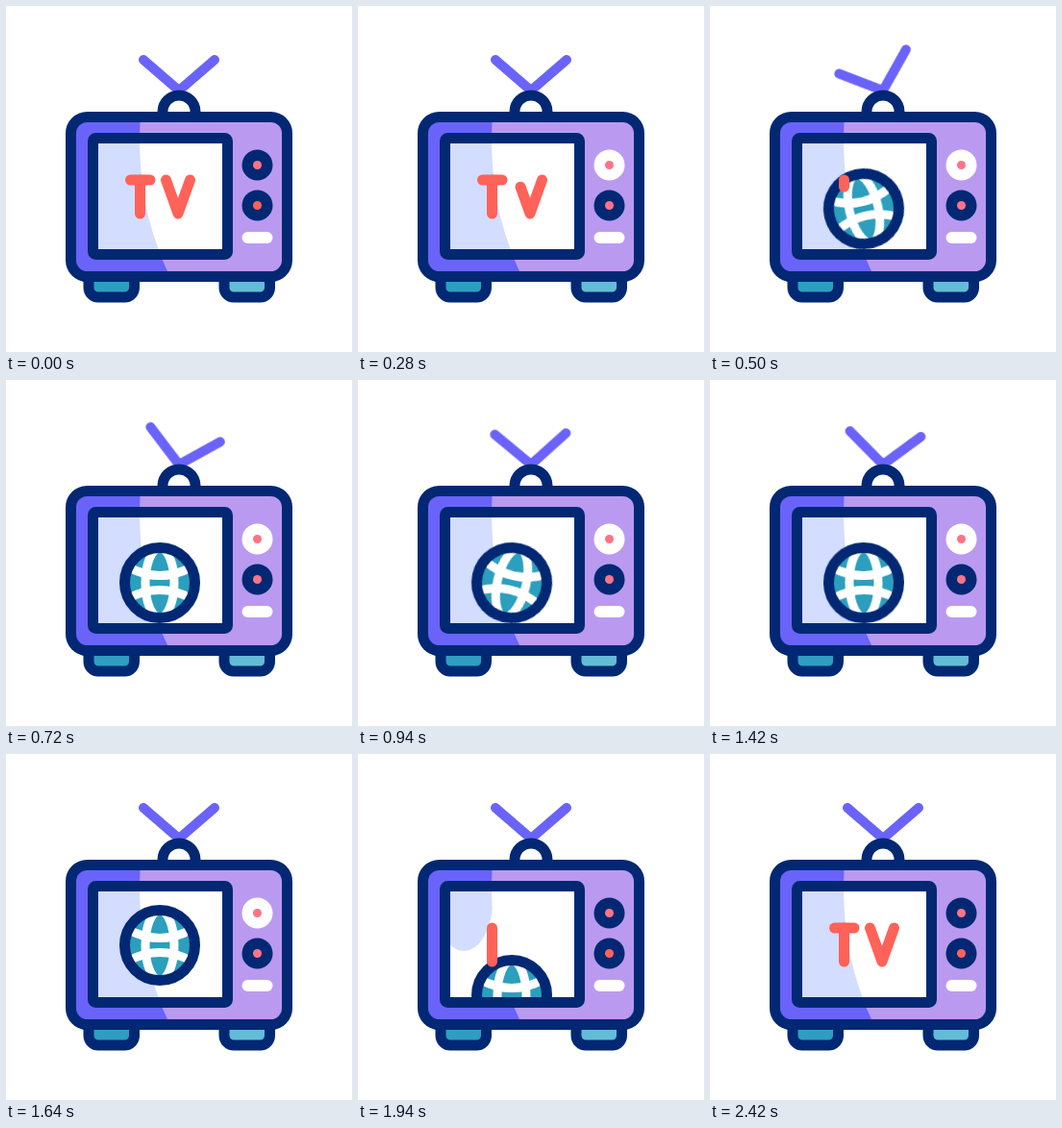
An HTML page that plays this animation: 360 by 360 pixels, repeating every 2.7 s.

```html
<!DOCTYPE html>
<html lang="en">
<head>
<meta charset="utf-8">
<title>Television</title>
<style>
  html, body { margin: 0; width: 100%; height: 100%; overflow: hidden; background: #fff; }
  svg { display: block; width: 100vw; height: 100vh; }

  :root { --navy: #022873; --red: #ff6258; --pink: #ff7387; --swing: cubic-bezier(.37, 0, .63, 1); }
  .line { stroke: var(--navy); stroke-width: 11; }
  .hollow { fill: none; }
  .grid { fill: none; stroke: #fff; stroke-width: 9; }
  .letter {
    fill: none; stroke: var(--red); stroke-width: 11;
    stroke-linecap: round; stroke-linejoin: round;
    stroke-dasharray: 1 2;
  }

  .antenna, .fall, .spin, .reveal, .letter, .knob, .dot {
    animation: 2700ms linear infinite;
  }
  .antenna {
    fill: none; stroke: #6a63fa; stroke-width: 10; stroke-linecap: round; stroke-linejoin: round;
    transform-origin: 180px 88px;
    animation-name: antenna; animation-timing-function: var(--swing);
  }
  .fall { animation-name: fall; }
  .spin { animation-name: spin; animation-timing-function: var(--swing); }
  .reveal { transform-origin: 110px 150px; animation-name: reveal; }
  .stem { animation-name: stem; }
  .bar { animation-name: bar; }
  .vee { animation-name: vee; }
  .knob { animation-name: knob; animation-timing-function: step-end; }
  .dot { animation-name: dot; animation-timing-function: step-end; }

  @keyframes antenna {
    0%, 10.4% { transform: rotate(0deg); }
    16.3% { transform: rotate(-23deg); }
    28% { transform: rotate(13deg); }
    39.6% { transform: rotate(-9deg); }
    51.3% { transform: rotate(5deg); }
    57.8%, 100% { transform: rotate(0deg); }
  }
  @keyframes fall {
    0%, 9.6% { transform: translate(160px, 95px); animation-timing-function: cubic-bezier(.33, 0, .67, .33); }
    18.4%, 53.7% { transform: translate(160px, 211px); animation-timing-function: var(--swing); }
    60.7% { transform: translate(160px, 199px); animation-timing-function: cubic-bezier(.33, 0, .67, .33); }
    77%, 100% { transform: translate(160px, 310px); }
  }
  @keyframes spin {
    0%, 9.6% { transform: rotate(-50deg); }
    18.5% { transform: rotate(-13deg); }
    34.8% { transform: rotate(13deg); }
    45.2% { transform: rotate(-5deg); }
    55%, 100% { transform: rotate(0deg); }
  }
  @keyframes reveal {
    0%, 64% { transform: scale(5); }
    71.85% { transform: scale(1); }
    80%, 100% { transform: scale(5); }
  }
  @keyframes stem {
    0%, 13% { stroke-dashoffset: 0; opacity: 1; }
    19.99% { stroke-dashoffset: -1; opacity: 1; }
    20% { stroke-dashoffset: 1; opacity: 0; }
    65.9% { stroke-dashoffset: 1; opacity: 0; }
    65.91% { stroke-dashoffset: 1; opacity: 1; }
    71.85%, 100% { stroke-dashoffset: 0; opacity: 1; }
  }
  @keyframes bar {
    0%, 11% { stroke-dashoffset: 0; opacity: 1; }
    17% { stroke-dashoffset: -1; opacity: 1; }
    17.01% { stroke-dashoffset: 1; opacity: 0; }
    72.2% { stroke-dashoffset: 1; opacity: 0; }
    72.21% { stroke-dashoffset: 1; opacity: 1; }
    77%, 100% { stroke-dashoffset: 0; opacity: 1; }
  }
  @keyframes vee {
    0%, 9.6% { stroke-dashoffset: 0; opacity: 1; }
    17.5% { stroke-dashoffset: -1; opacity: 1; }
    17.51% { stroke-dashoffset: 1; opacity: 0; }
    76% { stroke-dashoffset: 1; opacity: 0; }
    76.01% { stroke-dashoffset: 1; opacity: 1; }
    85.2%, 100% { stroke-dashoffset: 0; opacity: 1; }
  }
  @keyframes knob {
    0% { fill: var(--navy); }
    9.6% { fill: #fff; }
    66% { fill: var(--navy); }
    100% { fill: var(--navy); }
  }
  @keyframes dot {
    0% { fill: var(--red); }
    9.6% { fill: var(--pink); }
    66% { fill: var(--red); }
    100% { fill: var(--red); }
  }
</style>
</head>
<body>
<svg viewBox="0 0 360 360">
  <defs>
    <clipPath id="body"><rect x="67.5" y="115.5" width="225" height="166" rx="17"/></clipPath>
    <clipPath id="screen"><rect x="92" y="139" width="137" height="118"/></clipPath>
    <clipPath id="reveal"><ellipse class="reveal" cx="110" cy="150" rx="30" ry="54"/></clipPath>
    <clipPath id="ball"><circle r="33"/></clipPath>
    <path id="shade" d="M60 110H139.500V121C137 180 146 228 169 278V290H60Z"/>
  </defs>

  <path class="antenna" d="M143 56L180 88L217 56"/>
  <path class="line" fill="#fff" d="M163 116V110A17 17 0 0 1 197 110V116"/>

  <rect class="line" fill="#2f9dc0" x="86" y="270" width="47.500" height="33" rx="10"/>
  <rect class="line" fill="#63bcd6" x="227" y="270" width="47.500" height="33" rx="10"/>
  <rect class="line" fill="none" x="86" y="280.500" width="47.500" height="1"/>
  <rect class="line" fill="none" x="227" y="280.500" width="47.500" height="1"/>

  <g clip-path="url(#body)">
    <rect x="62" y="110" width="236" height="177" fill="#b99af0"/>
    <use href="#shade" fill="#6a63fa"/>
  </g>
  <rect class="line hollow" x="67.500" y="115.500" width="225" height="166" rx="17"/>

  <g clip-path="url(#screen)">
    <rect x="90" y="137" width="141" height="122" fill="#fff"/>
    <g clip-path="url(#reveal)"><use href="#shade" fill="#d2ddff"/></g>
    <g class="fall">
      <g class="spin">
        <g clip-path="url(#ball)">
          <circle r="33" fill="#2b9fbd"/>
          <ellipse class="grid" rx="15" ry="36"/>
          <path class="grid" d="M-34 -17Q0 2 34 -17M-34 17Q0 -2 34 17"/>
        </g>
        <circle class="line hollow" r="36.500"/>
      </g>
    </g>
    <path class="letter stem" pathLength="1" d="M139.500 216V181"/>
    <path class="letter bar" pathLength="1" d="M129.500 181H150"/>
    <path class="letter vee" pathLength="1" d="M166.500 181L179 216L191.500 181"/>
  </g>
  <rect class="line hollow" x="90.500" y="137.500" width="140" height="121" rx="3"/>

  <circle class="knob" cx="261.500" cy="165.500" r="16"/>
  <circle cx="261.500" cy="165.500" r="4.500" fill="#ff7387"/>
  <circle cx="261.500" cy="207.500" r="16" fill="#022873"/>
  <circle class="dot" cx="261.500" cy="207.500" r="4.500"/>
  <rect x="245.500" y="235" width="32" height="12" rx="6" fill="#fff"/>
</svg>
</body>
</html>
```
